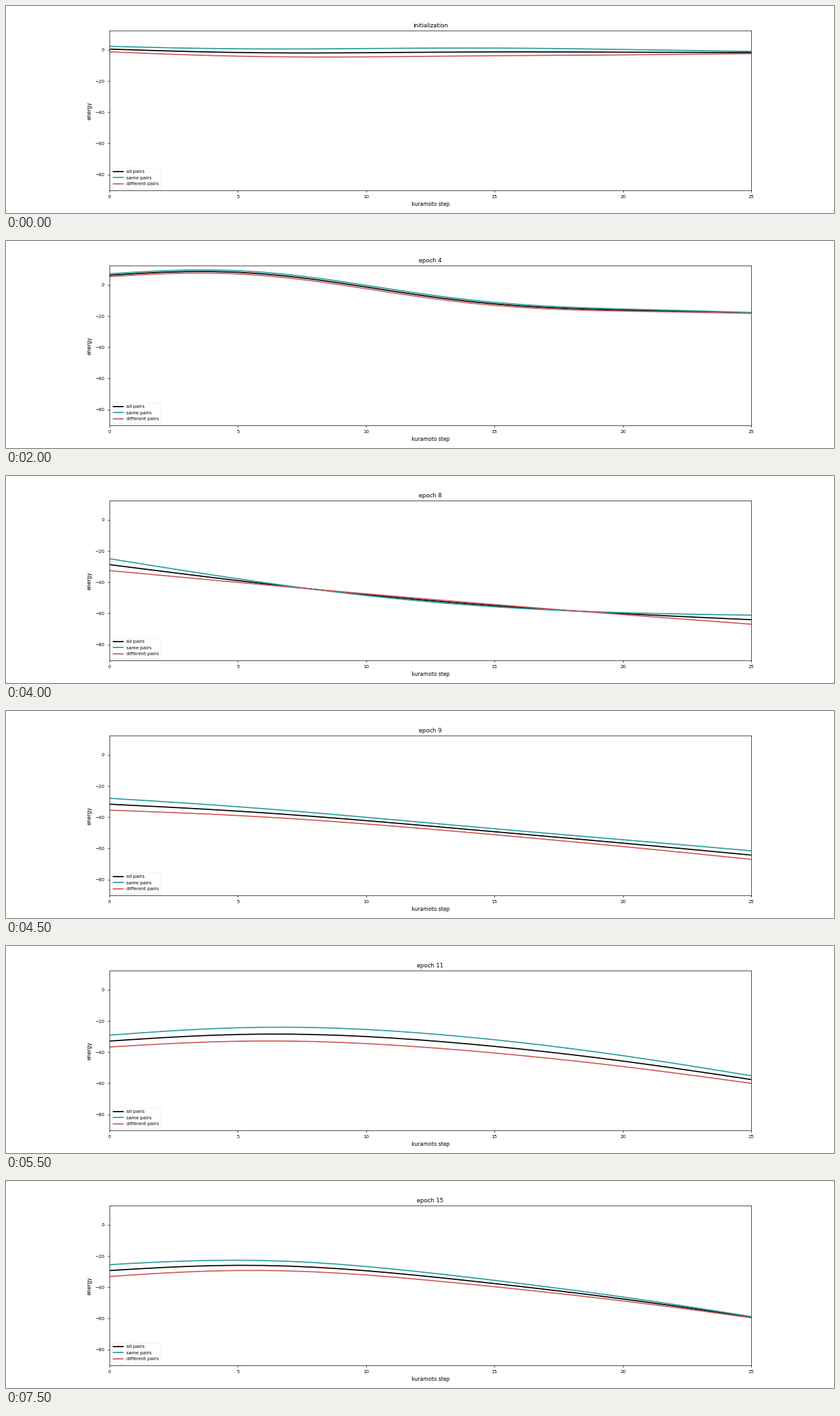
Animation of 1280x320 px, one loop 8 s. Source, as a matplotlib script:

```python
import numpy as np
import matplotlib.pyplot as plt
from matplotlib.animation import FuncAnimation

EPOCHS = 16
STEPS = np.arange(26)
PHASE = np.pi * STEPS / STEPS[-1]

# Key points over the epochs: a line from start to end, bent by bow and skew.
MEAN = dict(
    start={0: 0.5, 4: 6.2, 6: -15.4, 8: -28.7, 10: -34.6, 13: -29.3},
    end={0: -1.7, 2: -6.4, 3: -31, 4: -18, 6: -16.4, 7: -85, 8: -64,
         10: -64.5, 11: -57.5, 15: -59.2},
    bow={0: -1.2, 4: 0.2, 6: 13.6, 8: -5.4, 10: 10.3, 13: 18.3, 15: 11.7},
    skew={0: -0.8, 4: 5.1, 6: 1.5, 8: 0, 10: 1, 15: 1.9},
)
GAP = dict(
    start={0: 1.75, 4: 0.9, 6: 3.1, 8: 3.8},
    end={0: 0.7, 4: 0.3, 6: -1.45, 8: 2.9, 13: 2.1, 15: 0.4},
    bow={0: 1.4, 4: 0.45, 6: 1.8, 8: -4.2, 10: 1.6, 15: 0.3},
    skew={0: 0},
)


def bent_line(epoch, tracks):
    """Straight line plus three sine harmonics, sampled at every step."""
    value = {name: np.interp(epoch, list(keys), list(keys.values()))
             for name, keys in tracks.items()}
    line = np.linspace(value["start"], value["end"], len(STEPS))
    ripple = np.sin(2 * PHASE) + 0.36 * np.sin(3 * PHASE)
    return line + value["bow"] * np.sin(PHASE) + value["skew"] * ripple


plt.rcParams["font.family"] = "DejaVu Sans"
fig, ax = plt.subplots(figsize=(20, 5), dpi=64)

lines = [
    ax.plot(STEPS, np.zeros(len(STEPS)), color=color, lw=2, label=label)[0]
    for color, label in [
        ("black", "all pairs"),
        ("#2a9c9e", "same pairs"),
        ("#cd5c5c", "different pairs"),
    ]
]
ax.set_xlim(0, 25)
ax.set_ylim(-90, 12.2)
ax.set_xticks(range(0, 26, 5))
ax.set_yticks(range(-80, 1, 20))
ax.tick_params(labelsize=8, pad=5)
ax.set_xlabel("kuramoto step", fontsize=9)
ax.set_ylabel("energy", fontsize=9)
title = ax.set_title("initialization", fontsize=10)
ax.legend(loc="lower left", fontsize=8, edgecolor="0.93")


def update(epoch):
    mean, gap = bent_line(epoch, MEAN), bent_line(epoch, GAP)
    for line, side in zip(lines, (0, 1, -1)):
        line.set_ydata(mean + side * gap)
    title.set_text(f"epoch {epoch}" if epoch else "initialization")
    return [*lines, title]


anim = FuncAnimation(fig, update, frames=EPOCHS, interval=500, repeat=True,
                     repeat_delay=0, blit=False)
plt.show()
```
